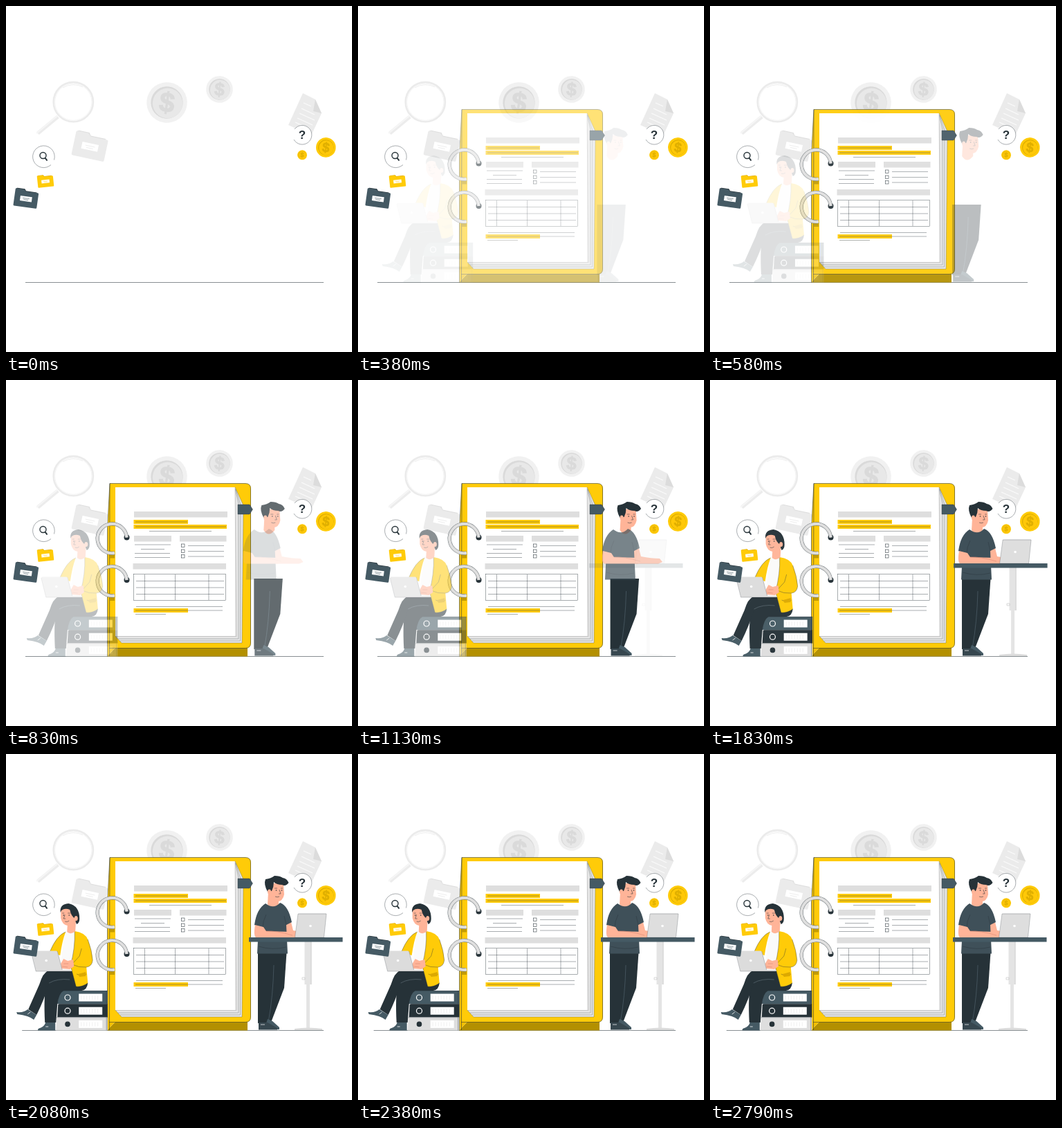
An HTML page for the animation above (2.83 s loop, 500 by 500 pixels).

```html
<!DOCTYPE html>
<html lang="en">
<head>
<meta charset="utf-8">
<style>
html, body { margin: 0; width: 100%; height: 100%; overflow: hidden; background: #fff; }
svg { display: block; width: 100vw; height: 100vh; }
text { font-family: "Liberation Sans", Arial, sans-serif; font-weight: bold; text-anchor: middle; }
.ln { fill: none; stroke: #263238; stroke-width: .55; }
.thin { fill: none; stroke: #263238; stroke-width: .4; }
.skin { fill: #ffb498; }
.ink { fill: #263238; }
.slate { fill: #455a64; }
.gold { fill: #ffcb08; }
.bar { fill: #dedede; }
.white { fill: #fff; }
</style>
</head>
<body>
<svg viewBox="0 0 500 500">
  <g id="back">
    <path d="M75 160L46 184" stroke="#ececec" stroke-width="5.5"/>
    <path d="M74 159L44 184" stroke="#f6f6f6" stroke-width="2"/>
    <circle cx="97.3" cy="138.7" r="28.6" fill="#fff" stroke="#ebebeb" stroke-width="2.6"/>
    <circle cx="97.3" cy="138.7" r="26.6" fill="none" stroke="#f5f5f5"/>
    <path d="M82 118Q97 110 111 117" fill="none" stroke="#e8e8e8" stroke-width=".7"/>
    <path d="M429 126L447 135L456 155L441 187L408 172Z" fill="#ebebeb"/>
    <path d="M447 135L456 155L444 152Z" fill="#dcdcdc"/>
    <path d="M430 140L441 145M427 148L446 157M424 155L446 165M421 162L443 172M418 168L438 177" stroke="#fafafa" stroke-width="1.3"/>
  </g>
  <path id="floor" class="ln"/>

  <g id="binder">
    <path d="M158 387H349V399.5H146Z" fill="#b39000"/>
    <path d="M150 149.500L146.500 215V399L158 387V155Z" fill="#f3c000"/>
    <path d="M150 149.500H346Q354 149.500 354 157V380Q354 387.500 346 387.500H149Z" class="gold"/>
    <path d="M146.500 399.500V215L150 149.500H346Q353.500 149.500 353.500 157V380Q353.500 387.500 346 387.500H149M150 149.500L149.500 399" class="ln"/>
    <path d="M331 155L343 181L341 380H167L158 370Z" fill="#e6e6e6"/>
    <path d="M331 155L343 181L341 380H167L158 370M332 158L339 180L338.500 377H165M331 157L336 178V374H162" class="thin" opacity=".7"/>
    <path d="M158 155H331V370H158Z" class="white"/>
    <path d="M331 155L333 370.500H158" fill="none" stroke="#a0a0a0" stroke-width=".5"/>
    <g id="page"></g>
    <path d="M335 180H352L356.500 187L352 194H335Z" class="slate"/>
    <path d="M335 180H352L356.500 187L352 194H335Z" class="thin"/>
  </g>

  <g id="man">
    <path d="M364 287H405.500L402 338L382.500 389H364Q364 330 364 287Z" class="ink"/>
    <path d="M387 305Q386 350 379 388" fill="none" stroke="#50616a" stroke-width=".7"/>
    <path d="M376 389L378 383L385 386L395 395V398H376Z" class="slate"/>
    <path d="M365 388H378L392 396V398.500H365Z" fill="#37474f"/>
    <path d="M368 391H374" stroke="#fff" stroke-width=".7"/>
    <path d="M379 200L378 217Q385 228 394 217V208Z" class="skin"/>
    <path d="M380 190Q383 185 401 187L402 203Q400 213 392 213Q384 212 380 200Z" class="skin"/>
    <path d="M378 199Q372 188 375 181Q383 180 388 176Q396 176 400 179Q406 180 408.500 186Q404 192 399 189Q391 189 387 185Q387 192 384 198Z" class="ink"/>
    <ellipse cx="380.500" cy="199" rx="2.500" ry="3.500" class="skin"/>
    <path d="M388 194H392M397 194H400M395 196L397 202H394M389 206Q392 207.500 395 206" class="ln"/>
    <circle cx="390.500" cy="197" r=".8" class="ink"/><circle cx="398.500" cy="197" r=".8" class="ink"/>
  </g>

  <g id="torso">
    <path d="M403 246L412 243L415 255Q430 258 442 258L446 263L440 265.500H405Z" class="skin"/>
    <path d="M375 216Q387 225 396 215Q408 219 413 243L405 247L407 288.500H363L365 250L359 247Q362 224 375 216Z" fill="#3f5059"/>
    <path d="M376 232Q371 242 371 250M405 247L402 234M365 278Q385 284 405 279" class="thin"/>
    <path d="M360 247L372 250L376 256L413 257L416 263L410 265.500H362Q357 264 360 247Z" class="skin"/>
    <path d="M376 256Q390 255 414 262" fill="none" stroke="#d88972" stroke-width=".6"/>
  </g>

  <g id="desk">
    <path d="M431.500 271H441.500V333H439V397H434V333H431.500Z" fill="#e4e4e4"/>
    <path d="M441 271V333M428 323H432V326H428Z" fill="none" stroke="#c8c8c8" stroke-width=".7"/>
    <path d="M417 399V397Q437 394 457 397V399Z" fill="#dcdcdc"/>
    <path d="M351 265H486.500V271.500H351Z" class="slate"/>
    <path d="M422 231Q422.500 230.500 424 230.500H462Q463.500 230.500 463 232L459.500 265H417.500Z" fill="#dedede"/>
    <path d="M422 231L417.500 265H459.500L463 231Z" class="thin" opacity=".6"/>
    <circle cx="440" cy="248.500" r="1.800" class="white"/>
  </g>

  <g id="woman">
    <g id="files"></g>
    <path d="M57 388Q55 350 59 333Q65 316 97 314L119 331Q118 341 110 342H84Q77 346 75 362L73 388Z" class="ink"/>
    <path d="M99 313L62 313Q54 316 49 333L33 369L45 377Q56 355 63 332Q80 322 101 336Z" class="ink"/>
    <path d="M63 331Q75 324 93 326" fill="none" stroke="#66757d" stroke-width=".6"/>
    <path d="M32 369L45 377L41 384Q34 378 17 376L16 373Q27 374 32 369Z" class="slate"/>
    <path d="M58 388H72V399.500H47Q46 397 50 396Q56 394 58 388Z" class="slate"/>
    <path d="M32 376L36 373M58 394H62" stroke="#fff" stroke-width=".8"/>
    <path d="M86 257H102L101 313H79Z" fill="#fafafa"/>
    <path d="M87 257Q74 262 64 286L79 291Q82 270 87 257Z" class="gold"/>
    <path d="M100 256Q115 258 119 268Q125 284 126 298Q125 307 117 308L119 331Q111 337 102 336L94 306Q101 280 100 256Z" class="gold"/>
    <path d="M100 256Q101 280 94 306M117 308Q106 309 96 304L107 292L110 281M119 331Q111 337 102 336L95 309M119 268Q125 284 126 298Q125 307 117 308M103 318Q110 322 117 318M87 257Q74 262 64 286" class="thin"/>
    <path d="M105 318L116 315V321L107 322Z" fill="#dca900"/>
    <path d="M98 297L90 299L84 296L80 303L81 310L93 311L99 307Z" class="skin"/>
    <path d="M84 303L91 303M82 307L90 308" stroke="#d88972" stroke-width=".6"/>
    <path d="M90 240L89 257Q95 262 101 256L102 238Z" class="skin"/>
    <path d="M80 224Q84 219 98 223L103 236Q99 248 90 248Q82 247 80 237Z" class="skin"/>
    <path d="M79.500 229Q78 217 91 216Q107 219 107 238Q107 244 103 246Q101 243 101 238Q95 235 93 225Q86 222 81 226Z" class="ink"/>
    <ellipse cx="102" cy="237.500" rx="2.500" ry="3.500" class="skin"/>
    <path d="M82 230H85M90 230H94M86 232L84 238H87M86 242Q89 243.500 92 241" class="ln"/>
    <circle cx="84" cy="233" r=".8" class="ink"/><circle cx="92" cy="233" r=".8" class="ink"/>
    <path d="M37 286Q37 284.500 39 284.500H73Q75 284.500 75.500 286L82 312H96V314H44Z" fill="#dcdcdc"/>
    <path d="M37 286L44 314H96M75 285L82 312" class="thin" opacity=".6"/>
    <circle cx="59" cy="298.500" r="1.800" class="white"/>
  </g>

  <g id="front">
    <path d="M64 230A16 16 0 1 1 68.500 225L70 229Z" class="white"/>
    <circle cx="54.500" cy="217.500" r="15.800" class="white"/>
    <path d="M65 229.500A15.800 15.800 0 1 1 69.500 222.500" class="thin"/>
    <circle cx="53.500" cy="216" r="4.500" fill="none" stroke="#263238" stroke-width="1.400"/>
    <path d="M56.500 219.500L59.500 223.500" stroke="#263238" stroke-width="2"/>
    <circle cx="428" cy="186" r="13.800" class="white"/>
    <path d="M417 178A13.800 13.800 0 1 1 416 193" class="thin"/>
    <text x="428" y="192" font-size="17" fill="#263238">?</text>
  </g>
</svg>
<script>
const $ = id => document.getElementById(id);
const add = (id, html) => $(id).insertAdjacentHTML('beforeend', html);
const rect = (x, y, w, h, c) => `<rect x="${x}" y="${y}" width="${w}" height="${h}" class="${c}"/>`;
const rule = (x1, x2, y) => `M${x1} ${y}H${x2}`;

const coin = (x, y, r, rim, face, mark, tilt) => `<g transform="translate(${x} ${y}) rotate(${tilt})">
  <circle r="${r}" fill="${rim}"/><circle r="${r * .79}" fill="${mark}"/>
  <circle cx="${r * .04}" cy="${r * .03}" r="${r * .74}" fill="${face}"/>
  <text y="${r * .46}" font-size="${r * 1.36}" fill="${mark}" stroke="${mark}" stroke-width="${r * .04}">$</text></g>`;

const folder = (x, y, s, tilt, fill, dark) => `<g transform="translate(${x} ${y}) rotate(${tilt}) scale(${s})">
  <path d="M-22 -12V-17Q-22 -19 -20 -19H-5L-2 -15H20V-8Z" fill="${dark}"/>
  <path d="M-24 -16Q-24 -18 -22 -18H-6L-2 -14H22Q24 -14 24 -12V16Q24 18 22 18H-22Q-24 18 -24 16Z" fill="${fill}"/>
  <path d="M-12 -4H12V6H-12Z" fill="#fff"/><path d="M-7 0H7M-5 3H5" stroke="${fill}" stroke-width=".8"/></g>`;

add('back', coin(232.5, 139.5, 29.3, '#f1f1f1', '#e8e8e8', '#dadada', 8)
  + coin(308.5, 120.5, 19.3, '#f1f1f1', '#e8e8e8', '#dadada', 5)
  + folder(121.5, 202.5, 1, 12, '#ebebeb', '#dedede'));
add('front', coin(462.3, 204.4, 14.3, '#ffcb08', '#ffc808', '#dfaf00', 8)
  + coin(428, 215.3, 7, '#ffcb08', '#ffc808', '#dfaf00', 5)
  + folder(57, 253, .48, -6, '#ffcb08', '#d9a300')
  + folder(29, 278, .71, 8, '#455a64', '#263238'));

const rules = [[187, 262, 205], [187, 318, 212], [207, 297, 218.5], [186, 238, 238], [195, 229, 244.5],
  [186, 237, 250.5], [186, 237, 256.5], [263, 315, 239.5], [263, 315, 247.5], [263, 315, 255],
  [188, 313, 327.5], [187, 313, 333], [187, 231, 338.5], [188, 315, 290.5], [188, 315, 300], [188, 315, 309.5]];
add('page', [[185, 190, 135, 8.5], [185, 225, 54, 8.5], [251, 225, 67.5, 8.5], [183.5, 265, 134.5, 8.5]]
    .map(b => rect(...b, 'bar')).join('')
  + [[184.5, 202, 78.5, 6], [184.5, 209, 134.5, 6], [184.5, 330, 78.5, 6]].map(b => rect(...b, 'gold')).join('')
  + [237, 245, 252.5].map(y => rect(253.5, y, 4.5, 4.5, 'ln')).join('')
  + rect(184.5, 280.5, 133, 38, 'thin')
  + `<path class="thin" d="${rules.map(r => rule(...r)).join('')}M200.500 281V318M244.500 281V318M293 281V318"/>`);

// Binder rings
for (const y of [229.5, 291]) {
  const d = `M174.500 ${y - 2}A21.200 21.200 0 1 0 157 ${y + 20.5}`;
  add('binder', `<path d="M150 ${y + 21}h7v7h-7Z" fill="#c49c00"/>
    <circle cx="174.500" cy="${y - 2}" r="4" class="ink"/>`
    + [['#5c666b', 5.2], ['#d8d8d8', 4.4], ['#e4e4e4', 1.4]]
      .map(([c, w]) => `<path d="${d}" fill="none" stroke="${c}" stroke-width="${w}"/>`).join(''));
}

// Stacked box files
[['#455a64', '#fff'], ['#263238', '#fff'], ['#dedede', '#263238']].forEach(([fill, ring], i) => {
  const y = 342 + 19.2 * i, x = i == 1 ? 76 : 74;
  add('files', `<path d="M${x} ${y + 1}L${x + 2} ${y}H147.500V${y + 19}H${x - 1}Z" fill="${fill}"/>
    <path d="M${x} ${y + .3}H147.500M146 ${y}V${y + 19}" class="thin"/>
    <circle cx="89.800" cy="${y + 10}" r="${i == 2 ? 3.2 : 4}" fill="${i == 2 ? ring : 'none'}" stroke="${ring}" stroke-width="1.200"/>
    ${rect(106, y + 4.5, 34, 11, 'white')}
    <path d="M109 ${y + 10}H137" stroke="#efefef" stroke-width="6" stroke-dasharray="1 3"/>`);
});

// cubic-bezier(.36, -.01, .5, 1.38)
function ease(x) {
  if (x <= 0) return 0;
  if (x >= 1) return 1;
  const curve = (s, a, b) => 3 * (1 - s) ** 2 * s * a + 3 * (1 - s) * s * s * b + s ** 3;
  let lo = 0, hi = 1;
  for (let i = 0; i < 24; i++) {
    const mid = (lo + hi) / 2;
    if (curve(mid, .36, .5) < x) lo = mid; else hi = mid;
  }
  return curve(lo, -.01, 1.38);
}

// id, start, duration, starting offset
const LOOP = 2830;
const entries = [
  ['binder', 0, 940, 0],
  ['man', 200, 1300, -20],
  ['torso', 560, 1200, -20],
  ['desk', 930, 1000, -20],
  ['woman', 0, LOOP, 20],
];

function draw(now) {
  const t = now % LOOP;
  for (const [id, start, span, from] of entries) {
    const p = ease((t - start) / span), shift = from * (1 - p);
    $(id).setAttribute('transform', `translate(${shift} 0)`);
    $(id).setAttribute('opacity', Math.max(0, Math.min(1, p)));
    if (id == 'woman') $('floor').setAttribute('d', rule(Math.min(28, 24 + shift), 459, 399.5));
  }
}
const origin = performance.now();
(function tick() {
  draw(performance.now() - origin);
  requestAnimationFrame(tick);
})();
</script>
</body>
</html>
```
